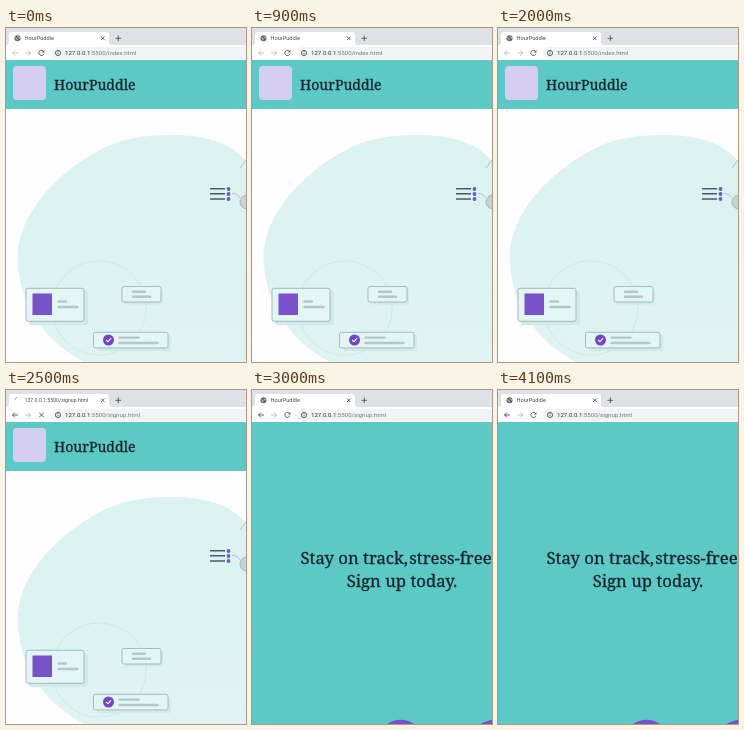
Animation of 240x334 px, one loop 5000 ms. Source, as an HTML page:

```html
<!DOCTYPE html>
<html lang="en">
<head>
<meta charset="utf-8">
<title>HourPuddle</title>
<style>
  html, body { margin: 0; width: 100%; height: 100%; overflow: hidden; background: #fff; }
  svg { display: block; width: 100%; height: 100%; }
  .ui { font-family: Roboto, Arial, sans-serif; }
  .slab { font-family: "Noto Serif", serif; fill: #17242c; stroke: #17242c; stroke-width: .3; }
  .plain { font-family: "Liberation Serif", Times, serif; fill: #17242c; font-size: 16.8px; }
  .icon { fill: none; stroke: #505459; stroke-width: .9; }
  .card { fill: #e3f5f5; stroke: #93adb2; stroke-width: .8; }
  .shade { fill: #d2e9ea; }
  .rule { stroke: #b4c8c9; stroke-width: 2.4; stroke-linecap: round; }
</style>
</head>
<body>
<svg viewBox="0 0 240 334" preserveAspectRatio="none">
  <defs>
    <linearGradient id="mint" x2="0" y2="1">
      <stop stop-color="#daf2f0"/>
      <stop offset="1" stop-color="#dff3f3"/>
    </linearGradient>
  </defs>

  <g id="home">
    <rect y="32" width="240" height="302" fill="#fefdff"/>
    <rect y="32" width="240" height="49" fill="#5dc9c6"/>
    <rect x="7" y="38" width="33" height="34" rx="4" fill="#d6cdf2"/>
    <text class="slab" x="48" y="62" font-size="14.1">HourPuddle</text>
    <path fill="url(#mint)" d="M240 133C224 113 195 107 165 107C135 107 112 112 94 122C50 145 8 190 12 235C14 276 37 312 78 334H240Z"/>
    <circle cx="93" cy="280" r="47" fill="none" stroke="#bddad9" stroke-width=".7" stroke-dasharray="2 1"/>

    <rect class="shade" x="23" y="263" width="59" height="34" rx="2"/>
    <rect class="card" x="20" y="260.3" width="58" height="33" rx="2"/>
    <rect x="26.5" y="265.5" width="19.5" height="21.5" fill="#7951ca"/>
    <path class="rule" d="M52.5 273.5h7.5M52.5 279h19"/>

    <rect class="shade" x="118" y="261" width="39" height="15.5" rx="2"/>
    <rect class="card" x="116" y="258.5" width="39" height="15.5" rx="2"/>
    <path class="rule" d="M127 263.8h12M127 268.8h17"/>

    <rect class="shade" x="91" y="307" width="74" height="16" rx="2"/>
    <rect class="card" x="87.5" y="304.3" width="74.5" height="15.6" rx="2"/>
    <circle cx="102.5" cy="312" r="5.5" fill="#7144c8"/>
    <path d="M100.2 312l1.8 1.8 3-3.6" fill="none" stroke="#fff" stroke-width="1.1"/>
    <path class="rule" d="M113.5 309.6h19M113.5 315h38"/>

    <path d="M204 160.7h15M204 165.8h15M204 170.9h15" stroke="#435d6b" stroke-width="1.5"/>
    <g fill="#7951ca">
      <circle cx="222.5" cy="161" r="1.9"/>
      <circle cx="222.5" cy="166" r="1.9"/>
      <circle cx="222.5" cy="171" r="1.9"/>
    </g>
    <path d="M226 165.5c4 0 5 1 8 4M234 140l6-8" fill="none" stroke="#9fb5b9" stroke-width=".8"/>
    <circle cx="241" cy="174" r="7" fill="#c5d3d5" stroke="#a5b7bb"/>
  </g>

  <g id="signup">
    <rect y="32" width="240" height="302" fill="#5dc9c6"/>
    <g fill="#7a4fcb">
      <ellipse cx="148.5" cy="344" rx="19" ry="14.2"/>
      <ellipse cx="244" cy="344" rx="22" ry="14.2"/>
    </g>
    <g id="fallback" class="plain" text-anchor="middle">
      <text x="150" y="173.5">Stay on track, stress-free.</text>
      <text x="150" y="196.5">Sign up today.</text>
    </g>
    <g id="styled" class="slab" font-size="16.7">
      <text x="48.5" y="173.5">Stay on track, <tspan dx="-3">stress-free.</tspan></text>
      <text x="150" y="196.5" text-anchor="middle">Sign up today.</text>
    </g>
  </g>

  <g class="ui">
    <rect width="240" height="17" fill="#dee1e6"/>
    <path d="M0 17q3 0 3-3V7q0-3 3-3h94q3 0 3 3v7q0 3 3 3Z" fill="#fff"/>
    <rect y="17" width="240" height="15" fill="#fff"/>
    <rect x="45" y="19" width="210" height="12" rx="6" fill="#f1f3f4"/>
    <g id="globe">
      <circle cx="11.5" cy="10.3" r="3" fill="#5b6067"/>
      <path d="M9.2 9.5l2 1.2-.3 1.7M11.8 8.2l1 1.5 1.3.4" fill="none" stroke="#fff" stroke-width=".7"/>
    </g>
    <path id="spinner" class="icon" d="M8.7 10.3a3 3 0 0 0 3 3"/>
    <text id="tab" x="18.5" y="12.3" fill="#45494d"></text>
    <path class="icon" d="M95 8.5l3.6 3.6m0-3.6L95 12.1M109.5 10.3h5.6m-2.8-2.8v5.6"/>
    <path id="back" class="icon" d="M12 25H6.5m2.6-2.6L6.5 25l2.6 2.6"/>
    <path class="icon" d="M19.3 25h5.5m-2.6-2.6l2.6 2.6-2.6 2.6" style="stroke:#b9bcc0"/>
    <g id="reload">
      <path class="icon" d="M37.7 23.7a2.6 2.6 0 1 0 .2 2"/>
      <path d="M38.4 22v2.6h-2.6Z" fill="#505459"/>
    </g>
    <path id="stop" class="icon" d="M33.2 22.7l4.6 4.6m0-4.6l-4.6 4.6"/>
    <circle class="icon" cx="52" cy="25" r="2.6"/>
    <path class="icon" d="M52 24.7v1.6M52 23.3v.7"/>
    <text y="27.2" x="59" font-size="6.1" fill="#74787d"><tspan fill="#292c30">127.0.0.1</tspan><tspan id="path"></tspan></text>
  </g>
</svg>
<script>
const LOOP = 5000;
const el = id => document.getElementById(id);
const show = (id, on) => { el(id).style.display = on ? "" : "none"; };
const steps = [
  { at: 0, page: "home" },
  { at: 2400, page: "home", url: "signup", loading: true },
  { at: 2600, page: "signup", url: "signup", loading: true },
  { at: 2700, page: "signup", url: "signup" }
];
const start = performance.now();

function draw(time) {
  const { page, url = "index", loading = false } = steps.findLast(s => s.at <= time);
  const home = page === "home";
  const waiting = home && loading;
  const path = `:5500/${url}.html`;
  show("home", home);
  show("signup", !home);
  show("fallback", loading);
  show("styled", !loading);
  show("globe", !loading);
  show("spinner", loading);
  show("reload", !loading);
  show("stop", loading);
  el("path").textContent = path;
  el("tab").textContent = waiting ? "127.0.0.1" + path : "HourPuddle";
  el("tab").setAttribute("font-size", waiting ? 5.2 : 5.6);
  el("back").style.stroke = url === "index" ? "#b9bcc0" : "#505459";
  el("spinner").style.stroke = waiting ? "#a3a7ab" : "#6b86dc";
  const turn = waiting ? Math.floor(time / 100) * 90 : 0;
  el("spinner").setAttribute("transform", `rotate(${turn} 11.7 10.3)`);
}

function tick() {
  draw(Math.max(0, performance.now() - start) % LOOP);
  requestAnimationFrame(tick);
}
tick();
</script>
</body>
</html>
```
